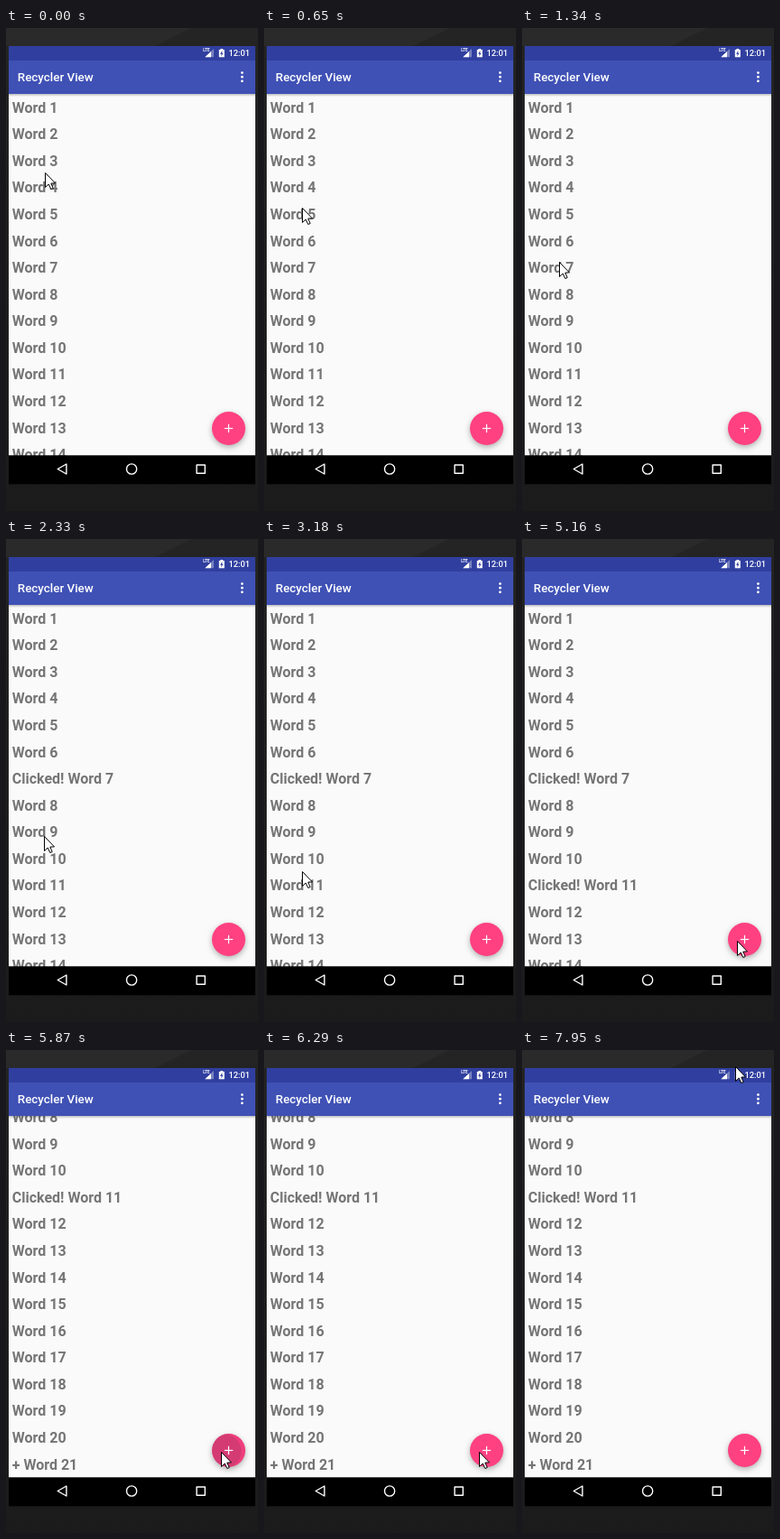
An HTML page with a canvas for the animation above (8000 ms loop, 279 by 535 pixels).

```html
<!DOCTYPE html>
<html lang="en">
<head>
<meta charset="utf-8">
<title>Recycler View</title>
<style>
  html, body { margin: 0; width: 100%; height: 100%; overflow: hidden; background: #1b1b1b; }
  canvas { display: block; width: 279px; height: 535px; }
</style>
</head>
<body>
<canvas id="stage" width="279" height="535"></canvas>
<script>
const ctx = document.getElementById('stage').getContext('2d');
const LOOP = 8000;
const ROW = 29.57;
const SCROLL = 220.5;
const FAB = { x: 246.5, y: 443.5, r: 18.5 };

// When each interaction takes effect, in ms
const CLICK_7 = 2060, CLICK_11 = 4370, ADDED = 5870, RIPPLE_FULL = 5990, RELEASED = 6290;

// The pointer glides between rests, redrawn once per STEP
const STEP = 120;
const HOME = { x: 43, y: 160 };
const MOVES = [
  { at: 530, steps: 4, x: 41, y: 238 },
  { at: 1220, steps: 2, x: 41, y: 259 },
  { at: 2210, steps: 3, x: 42, y: 354 },
  { at: 2880, steps: 3, x: 42, y: 368 },
  { at: 3460, steps: 3, x: 42, y: 379 },
  { at: 4620, steps: 3, x: 238, y: 445 },
  { at: 7690, steps: 2, x: 236, y: 18 }
];

const smooth = p => p * p * (3 - 2 * p);
const mix = (a, b, p) => Math.round(a + (b - a) * p);

function pointerAt(t) {
  let pos = HOME;
  for (const { at, steps, x, y } of MOVES) {
    if (t < at) break;
    const done = Math.min(steps, Math.floor((t - at) / STEP) + 1);
    const p = smooth(done / steps);
    pos = { x: mix(pos.x, x, p), y: mix(pos.y, y, p) };
  }
  return pos;
}

function rect(color, x, y, w, h) {
  ctx.fillStyle = color;
  ctx.fillRect(x, y, w, h);
}

function trace(points) {
  ctx.beginPath();
  points.forEach(([x, y]) => ctx.lineTo(x, y));
  ctx.closePath();
}

function polygon(color, points) {
  ctx.fillStyle = color;
  trace(points);
  ctx.fill();
}

function circle(x, y, r) {
  ctx.beginPath();
  ctx.arc(x, y, r, 0, Math.PI * 2);
}

function disc(color, x, y, r) {
  ctx.fillStyle = color;
  circle(x, y, r);
  ctx.fill();
}

function label(str, x, y, size, weight, color) {
  ctx.font = `${weight} ${size}px Roboto, sans-serif`;
  ctx.fillStyle = color;
  ctx.fillText(str, x, y);
}

function drawBezel() {
  const shade = ctx.createLinearGradient(0, 0, 0, 535);
  shade.addColorStop(0, '#242424');
  shade.addColorStop(1, '#1b1b1b');
  rect(shade, 0, 0, 279, 535);
  polygon('#2a2a2a', [[0, 0], [205, 0], [165, 20], [0, 20]]);
}

function rowText(n, t) {
  if (n === 21) return '+ Word 21';
  const clicked = (n === 7 && t >= CLICK_7) || (n === 11 && t >= CLICK_11);
  return (clicked ? 'Clicked! ' : '') + 'Word ' + n;
}

function drawList(t) {
  const added = t >= ADDED;
  const offset = added ? SCROLL : 0;
  ctx.save();
  ctx.beginPath();
  ctx.rect(3, 73, 273, 401);
  ctx.clip();
  rect('#fafafa', 3, 73, 273, 401);
  for (let n = 1; n <= (added ? 21 : 20); n++) {
    const y = 93.7 + (n - 1) * ROW - offset;
    if (y > 65 && y < 490) label(rowText(n, t), 6.7, y, 16, 700, '#757575');
  }
  const shade = ctx.createLinearGradient(0, 73, 0, 76);
  shade.addColorStop(0, 'rgba(0,0,0,.25)');
  shade.addColorStop(1, 'rgba(0,0,0,0)');
  rect(shade, 3, 73, 273, 3);
  ctx.restore();
}

function drawBars() {
  rect('#303f9f', 3, 20, 273, 16);
  rect('#3f51b5', 3, 36, 273, 37);
  label('Recycler View', 12.8, 59.1, 13.4, 500, '#fff');
  for (let i = -1; i <= 1; i++) disc('#fff', 261.4, 54.2 + i * 4.6, 1.4);

  // Signal
  label('LTE', 218.2, 26.3, 4.5, 700, '#fff');
  polygon('rgba(255,255,255,.35)', [[230, 23], [230, 32.3], [220.3, 32.3]]);
  polygon('#fff', [[227, 26], [227, 32.3], [220.3, 32.3]]);

  // Battery
  rect('#fff', 235.8, 24, 6, 8.3);
  rect('#fff', 237.4, 23, 2.8, 1);
  polygon('#303f9f', [[239.4, 25], [237, 28.8], [238.6, 28.8], [238.2, 31.5], [240.6, 27.8], [239.2, 27.8]]);
  label('12:01', 246.4, 31, 9.3, 500, '#fff');
}

function drawNav() {
  rect('#000', 3, 473.3, 273, 32);
  ctx.strokeStyle = '#fff';
  ctx.lineWidth = 1.4;
  ctx.lineJoin = 'round';
  trace([[57.2, 488.5], [66.9, 483], [66.9, 494]]);
  ctx.stroke();
  circle(139.1, 488.5, 5.6);
  ctx.stroke();
  ctx.strokeRect(211.1, 484, 9.2, 9.2);
}

function drawFab(t) {
  const { x, y, r } = FAB;
  ctx.save();
  ctx.shadowColor = 'rgba(0,0,0,.3)';
  ctx.shadowBlur = 6;
  ctx.shadowOffsetY = 2.5;
  disc('#ff4081', x, y, r);
  ctx.restore();

  if (t >= ADDED && t < RELEASED) {
    ctx.save();
    circle(x, y, r);
    ctx.clip();
    rect('rgba(60,45,65,.08)', x - r, y - r, 2 * r, 2 * r);
    disc('rgba(60,45,65,.15)', 241.5, 444.5, t < RIPPLE_FULL ? 19 : 30);
    ctx.restore();
  }
  rect('#fff', x - 4.7, y - 0.6, 9.4, 1.2);
  rect('#fff', x - 0.6, y - 4.7, 1.2, 9.4);
}

function drawPointer(t) {
  const { x, y } = pointerAt(t);
  ctx.save();
  ctx.translate(x + 0.5, y + 0.5);
  ctx.strokeStyle = '#000';
  ctx.lineWidth = 1;
  ctx.lineJoin = 'miter';
  polygon('#fff', [[0, 0], [0, 16], [3.7, 12.5], [6.3, 18], [8.7, 17], [6.3, 11.6], [11, 11.4]]);
  ctx.stroke();
  ctx.restore();
}

function draw(t) {
  drawBezel();
  drawList(t);
  drawBars();
  drawNav();
  drawFab(t);
  drawPointer(t);
}

const start = performance.now();
function tick() {
  draw((performance.now() - start) % LOOP);
  requestAnimationFrame(tick);
}
tick();
</script>
</body>
</html>
```
